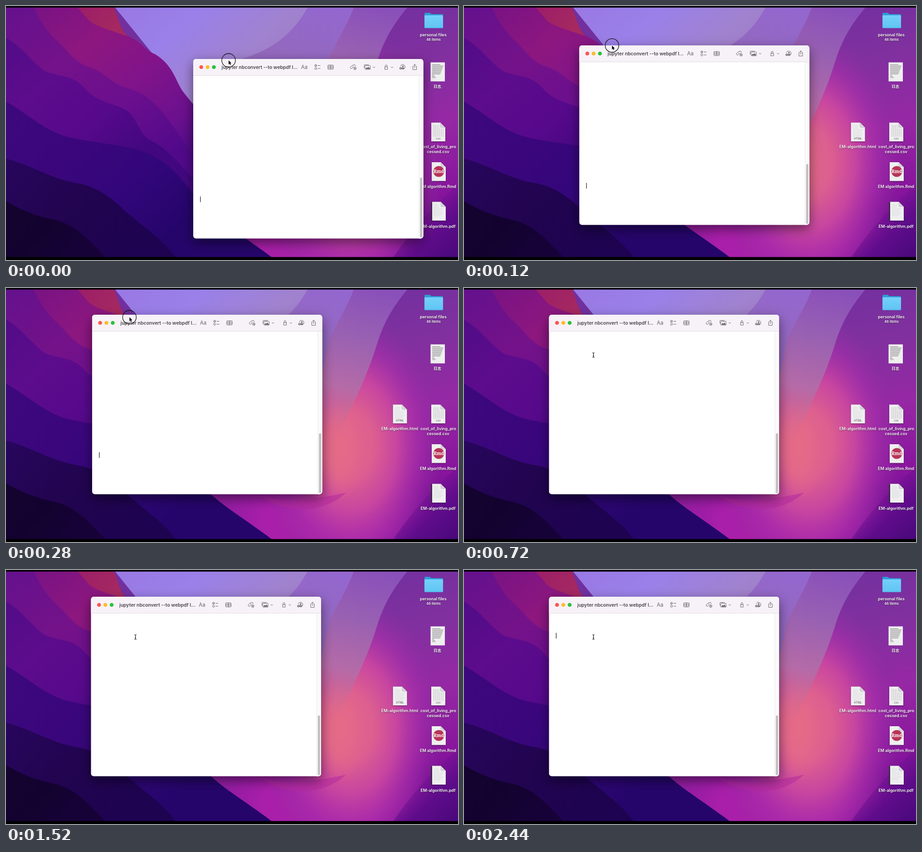
An HTML page with a canvas for the animation above (2480 ms loop, 997x561 px).

```html
<!DOCTYPE html>
<html lang="en">
<head>
<meta charset="utf-8">
<title>Desktop recording</title>
<style>
  html, body { margin: 0; width: 100%; height: 100%; overflow: hidden; background: #000; }
  canvas { display: block; }
</style>
</head>
<body>
<canvas id="stage" width="997" height="561"></canvas>
<script>
const ctx = document.getElementById('stage').getContext('2d');
const LOOP = 2480, STEP = 40;
const CLICK = 840, BLINK = 560;
const SANS = 'Inter, "Noto Sans CJK SC", "Noto Sans CJK", sans-serif';

function addStops(gradient, colors) {
  colors.forEach((c, i) => gradient.addColorStop(i / (colors.length - 1), c));
  return gradient;
}
const linear = (x0, y0, x1, y1, ...colors) =>
  addStops(ctx.createLinearGradient(x0, y0, x1, y1), colors);

function fill(path, color) {
  ctx.fillStyle = color;
  ctx.fill(new Path2D(path));
}

function stroke(path, color, width = 1) {
  ctx.strokeStyle = color;
  ctx.lineWidth = width;
  ctx.stroke(new Path2D(path));
}

function rect(x, y, w, h, color, radius = 0) {
  ctx.fillStyle = color;
  ctx.beginPath();
  ctx.roundRect(x, y, w, h, radius);
  ctx.fill();
}

function disc(x, y, r, color) {
  ctx.fillStyle = color;
  ctx.beginPath();
  ctx.arc(x, y, r, 0, 7);
  ctx.fill();
}

function glow(x, y, rx, ry, ...colors) {
  ctx.save();
  ctx.translate(x, y);
  ctx.scale(rx, ry);
  disc(0, 0, 1, addStops(ctx.createRadialGradient(0, 0, 0, 0, 0, 1), colors));
  ctx.restore();
}

function text(str, x, y, font, color, align = 'center') {
  ctx.font = font;
  ctx.fillStyle = color;
  ctx.textAlign = align;
  ctx.fillText(str, x, y);
}

function label(str, x, y, size = 9) {
  ctx.save();
  ctx.shadowColor = 'rgba(0,0,0,.6)';
  ctx.shadowBlur = 2;
  ctx.shadowOffsetY = 1;
  text(str, x, y, `600 ${size}px ${SANS}`, '#fff');
  ctx.restore();
}

function drawWallpaper() {
  rect(0, 0, 997, 561, linear(800, 0, 960, 560, '#72309f', '#81309f', '#9628a4', '#88159d', '#550983'));
  glow(690, 520, 260, 150, '#ae20aa', '#a81fa9', '#9d1aa500');
  glow(760, 345, 205, 300, '#e0668b', '#dc5f90', '#c745a0', '#a82faa99', '#8a2fa000');
  glow(738, 350, 62, 120, '#e56b86', '#e2678a', '#dd608f00');
  fill('M560 456 C600 476 690 466 750 452 C700 500 610 500 560 456Z', '#b52a9d88');
  fill('M997 395 C955 430 905 480 850 561 H997Z', linear(890, 450, 997, 561, '#7c129800', '#5f0c8b', '#470879'));

  // Upper ridges
  fill('M767 0 H888 C850 45 832 80 818 125 C800 185 775 235 750 290 L690 400 V110Z',
    linear(800, 0, 720, 330, '#8a50ba', '#9961b2', '#b56ba7', '#d6698f00'));
  fill('M238 0 H768 C752 45 727 80 712 117 C700 150 690 200 690 300 H413 V217Z',
    linear(240, 0, 500, 300, '#9a78e3', '#9a80e9', '#a082cf', '#a178ba'));
  fill('M667 0 H768 C752 45 727 80 712 117 L690 220 H500 L520 117 C590 95 635 60 667 0Z',
    linear(700, 0, 660, 125, '#9467cf', '#9368bd'));

  // Layered hills, back to front
  fill('M0 0 H237 C250 32 255 60 275 69 C300 81 309 99 328 106 C354 121 367 143 378 167 C389 190 398 201 413 217 C425 330 435 444 452 456 C490 490 540 519 594 561 H0Z',
    linear(80, 0, 390, 400, '#7a1383', '#8d177f', '#81148a', '#6b108e', '#3d0780'));
  fill('M155 0 H237 C250 32 255 60 272 68 C240 56 196 45 183 32 C175 22 164 10 155 0Z',
    linear(160, 0, 265, 60, '#9c1e68', '#a72b5f'));
  fill('M0 0 H60 C75 35 90 55 111 75 C140 102 151 126 187 136 C220 148 235 175 273 183 C320 196 350 235 413 330 V561 H0Z',
    linear(20, 0, 300, 380, '#65118d', '#741289', '#6b0f8e', '#50098a'));
  fill('M0 70 C35 90 52 118 83 142 C112 158 145 149 172 180 C205 219 248 213 273 236 C294 260 294 286 325 300 C355 315 383 350 413 380 V561 H0Z',
    linear(0, 70, 260, 360, '#520c88', '#5c0c8c', '#57098c', '#42077f'));
  fill('M0 211 C55 243 88 278 140 290 C190 302 241 304 284 316 C341 330 371 361 413 414 C430 440 440 448 452 456 C490 490 540 519 594 561 H0Z',
    linear(30, 220, 330, 540, '#3c087c', '#3b067c', '#33067b', '#25056a'));
  fill('M0 337 C60 353 100 382 155 391 C214 400 246 439 275 463 C309 492 350 520 379 561 H0Z',
    linear(0, 340, 260, 561, '#27065c', '#220450', '#1d0350'));
  fill('M0 431 C34 452 70 465 110 473 C157 485 185 519 225 561 H0Z',
    linear(0, 430, 150, 561, '#15032f', '#13022f', '#170238'));
  rect(0, 0, 997, 3.5, '#000');
  rect(0, 554.5, 997, 7, '#000');
}

function drawPage(x, y, tag) {
  ctx.save();
  ctx.translate(x, y);
  ctx.save();
  ctx.shadowColor = 'rgba(0,0,0,.45)';
  ctx.shadowBlur = 3;
  ctx.shadowOffsetY = 1;
  fill('M0 0 H20 L31 11 V41.5 H0Z', '#efeff0');
  ctx.restore();
  if (tag === 'CSV') {
    for (let i = 0; i < 10; i++) stroke(`M4 ${6.5 + i * 2.6} H${i < 3 ? 18 : 28}`, '#bcbcc0', .9);
    for (let i = 0; i < 5; i++) stroke(`M${7 + i * 4.5} 5 V31`, '#efeff0', 1);
  } else if (tag !== 'Rmd') {
    for (let i = 0; i < 9; i++) stroke(`M4 ${6.5 + i * 3} H${i < 3 ? 16 : 20 + i * 5 % 8}`, '#cfcfd3', .7);
  }
  fill('M20 0 V9 Q20 11 22 11 H31Z', '#d4d4d8');
  stroke('M20 0 V9 Q20 11 22 11 H31', '#b9b9be', .5);
  if (tag === 'Rmd') {
    disc(15.5, 20.5, 12, '#b83558');
    text('Rmd', 15.5, 24, 'bold 10px "Noto Serif", serif', '#fff');
  } else if (tag) {
    text(tag, 15.5, 37.5, `500 ${tag === 'CSV' ? 5 : 6}px ${SANS}`, '#67676b');
  }
  ctx.restore();
}

function drawIcons() {
  fill('M923 17 Q923 15 925 15 H935 L938 18 H962 Q964 18 964 20 V30 H923Z', '#2e9bd5');
  rect(923, 20.5, 41, 28.5, linear(0, 20, 0, 49, '#74d1fa', '#60c4f3'), 2);
  rect(923.5, 47.5, 40, 1, '#48add9');
  label('personal files', 942.5, 67);
  label('46 items', 943, 76.5, 7.5);

  rect(936.5, 124.5, 31.5, 42, '#efefef');
  for (let i = 0; i < 12; i++) {
    stroke(`M940 ${129.5 + i * 2.6} H${i > 8 ? 944 + i % 3 * 2 : 958 + i * 7 % 8}`, '#77777a', .9);
  }
  label('日志', 951.5, 181, 8.5);

  drawPage(853.5, 257.5, 'HTML');
  label('EM-algorithm.html', 868.5, 314);
  drawPage(938, 257.5, 'CSV');
  label('cost_of_living_pro', 953.5, 314);
  label('cessed.csv', 953, 325);
  drawPage(939, 345, 'Rmd');
  label('EM algorithm.Rmd', 953, 402);
  drawPage(939, 432.5);
  rect(937.5, 433, 2.5, 41, '#343038');
  label('EM-algorithm.pdf', 953, 490);
}

function drawToolbar() {
  const ink = '#686268';
  ['#fc5652', '#fdbc2e', '#2bc23f'].forEach((c, i) => disc(17.7 + i * 13.9, 18, 4.3, c));
  text('jupyter nbconvert --to webpdf l...', 62.5, 21.7, `600 10.4px ${SANS}`, '#4a444a', 'left');
  text('Aa', 245, 22, `400 11.5px ${SANS}`, ink);
  const icons = [
    // checklist
    'M268 14.5 a2.2 2.2 0 1 0 4.4 0 a2.2 2.2 0 1 0 -4.4 0 M269 14.5 l1 1 l2 -2.5',
    'M268 21 a2.2 2.2 0 1 0 4.4 0 a2.2 2.2 0 1 0 -4.4 0 M274.5 14.5 h6 M274.5 21 h6',
    // table
    'M298 13.5 h10 q1 0 1 1 v7 q0 1 -1 1 h-10 q-1 0 -1 -1 v-7 q0 -1 1 -1z M297 16.5 h12 M297 19.5 h12 M303 13.5 v9',
    // link
    'M352 19 l-2 2 a2.3 2.3 0 0 1 -3 -3.3 l3 -3 a2.3 2.3 0 0 1 3.3 0 M351 17 a2.2 2.2 0 0 0 3 .5',
    'M352 14.5 l1.5 -1.4 a2.3 2.3 0 0 1 3.3 3.2 M354 20.8 a2.8 2.8 0 1 0 5.6 0 a2.8 2.8 0 1 0 -5.6 0 M356.8 19.3 v3 M355.3 20.8 h3',
    // pictures
    'M380 14.5 h9.5 q1 0 1 1 v6.5 q0 1 -1 1 h-9.5 q-1 0 -1 -1 v-6.5 q0 -1 1 -1z M377 20 v-6 q0 -1.3 1.3 -1.3 h9',
    // chevrons
    'M396.5 17 l2.3 2.3 l2.3 -2.3 M436.2 17 l2.3 2.3 l2.3 -2.3',
    // lock
    'M422.5 17.5 h6 v5.5 h-6z M423.6 17.5 v-2.5 a1.9 1.9 0 0 1 3.8 0 v2.5',
    // person
    'M457 16 a5.2 5.2 0 1 1 3.5 6.5',
    // share
    'M486.5 15.8 h-2 v7.7 h8 v-7.7 h-2 M488.5 20 v-8 M486.3 14 l2.2 -2.2 l2.2 2.2'
  ];
  icons.forEach(d => stroke(d, ink));
  fill('M380 22 l3 -4 l2 2 l2 -3 l3 5z', ink);
  disc(462.5, 16.2, 1.7, ink);
  fill('M459 21.5 a3.6 3.6 0 0 1 7 0z', ink);
  disc(457.5, 20.5, 2.6, ink);
  stroke('M457.5 19 v3 M456 20.5 h3', '#f7f2f7', .8);
}

function drawWindow(x, y, caretY) {
  ctx.save();
  ctx.translate(x, y);
  ctx.save();
  ctx.shadowColor = 'rgba(0,0,0,.5)';
  ctx.shadowBlur = 26;
  ctx.shadowOffsetY = 9;
  rect(0, 0, 507.5, 396.5, '#fff', 6);
  ctx.restore();
  rect(0, 0, 507.5, 36.5, '#f7f2f7', [6, 6, 0, 0]);
  rect(0, 36, 507.5, 1, '#e2dde2');
  rect(497.5, 37, 10, 359.5, '#fafafa', [0, 0, 6, 0]);
  rect(497.5, 37, 1, 359.5, '#e8e8e8');
  rect(500.3, 262, 5, 132, '#c1c1c1', 2.5);
  drawToolbar();
  if (caretY !== null) rect(15.3, caretY - 6.3, 1.1, 12.6, '#000');
  ctx.restore();
}

function drawPointer(x, y, beam, pressed) {
  ctx.save();
  ctx.translate(x, y);
  if (pressed) {
    ctx.beginPath();
    ctx.arc(0, 0, 15, 0, 7);
    ctx.strokeStyle = '#111';
    ctx.lineWidth = 1.3;
    ctx.stroke();
  }
  if (beam) {
    stroke('M-2.5 -5 Q0 -5 0 -3.5 Q0 -5 2.5 -5 M0 -4 V4 M-2.5 5 Q0 5 0 3.5 Q0 5 2.5 5 M-1.3 1.5 H1.3', '#111', 1.1);
  } else {
    const arrow = 'M0 0 V9 L2 7.2 L3.4 10.2 L5 9.5 L3.7 6.6 H6.3Z';
    stroke(arrow, '#fff', 1.4);
    fill(arrow, '#000');
  }
  ctx.restore();
}

// Decelerating travel; power sets how sharply it slows.
const glide = (from, to, t, duration, power) =>
  to + (from - to) * Math.max(0, 1 - t / duration) ** power;

function caretAt(t) {
  if (t < CLICK) return t < 400 ? 310 : null;
  return Math.floor((t - CLICK) / BLINK) % 2 ? null : 86;
}

function draw(now) {
  const t = Math.floor(now % LOOP / STEP) * STEP;
  drawWallpaper();
  drawIcons();
  drawWindow(glide(413, 187.5, t, 360, 3), glide(117, 59, t, 280, 1.3), caretAt(t));

  let px = glide(491, 271, t, 360, 3.4), py = glide(120, 64.5, t, 280, 1.6);
  if (t > 400) {
    const k = Math.min(1, (t - 400) / 280), ease = k * k * (3 - 2 * k);
    px += (285.5 - px) * ease;
    py += (148 - py) * ease;
  }
  drawPointer(px, py, t > 400 && py > 96, t < 400 || (t >= CLICK && t < CLICK + 80));
}

const start = performance.now();
(function tick() {
  draw(performance.now() - start);
  requestAnimationFrame(tick);
})();
</script>
</body>
</html>
```
